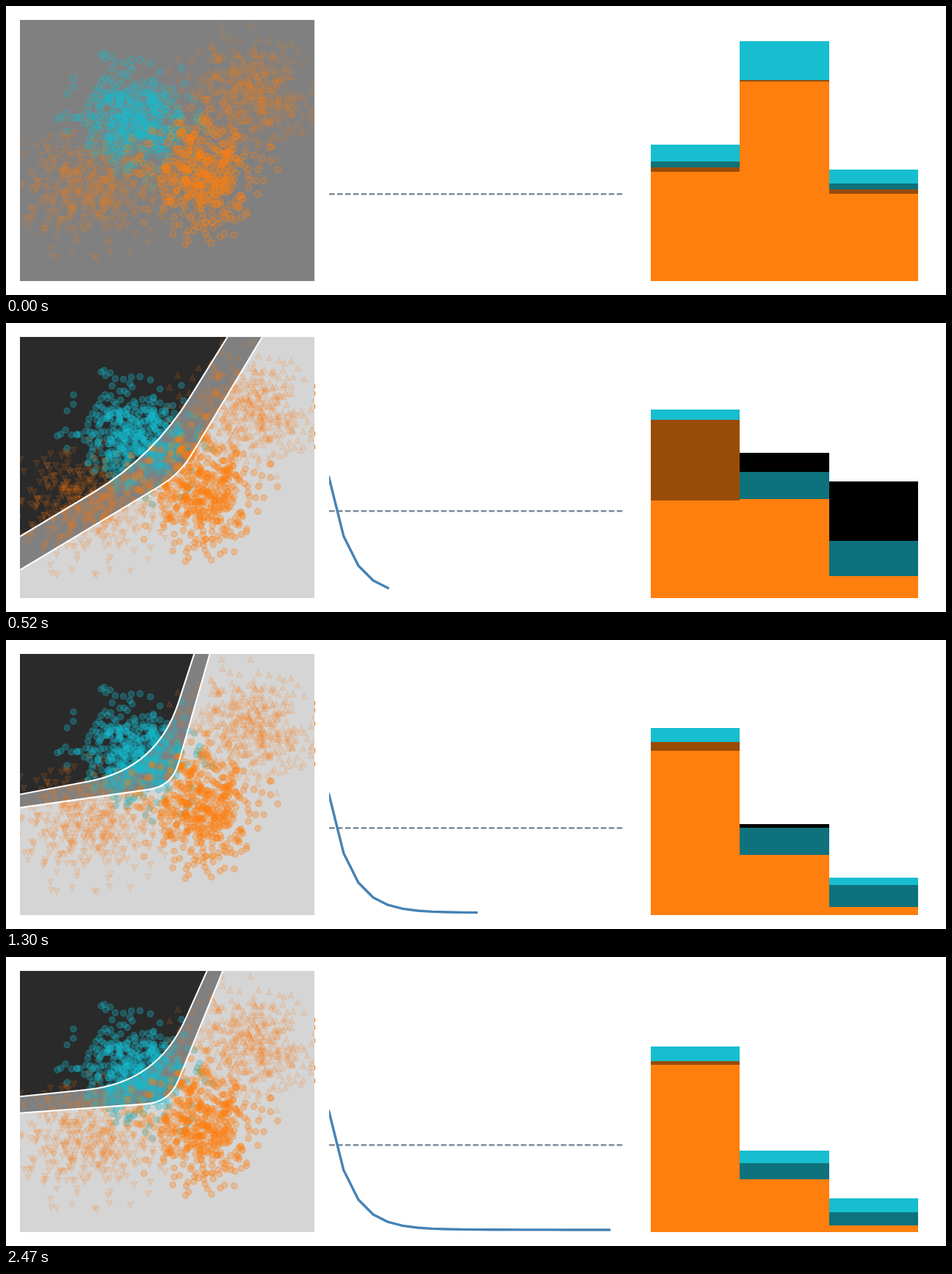
Recreate the animation shown at these times as an HTML page with a canvas. Size 1280 by 394 pixels, loop 2600 ms.

```html
<!DOCTYPE html>
<html lang="en">
<head>
<meta charset="utf-8">
<title>Classifier training</title>
<style>
  html, body { margin: 0; width: 100%; height: 100%; overflow: hidden; background: #fff; }
  canvas { display: block; }
</style>
</head>
<body>
<canvas id="stage" width="1280" height="394"></canvas>
<script>
const ctx = document.getElementById('stage').getContext('2d');
const STEP = 130, STEPS = 20;
const CYAN = '#17becf', ORANGE = '#ff7f0e';
const LEFT = 19, TOP = 19, RIGHT = 420, BASE = 375;

// Distances that shrink as training goes on
const decay = (size, rate, k) => size * rate ** k;
const bell = (size, width, k) => size * Math.exp(-k * k / width);

const lossAt = k => 372 - decay(160, 0.5, k) - decay(2, 0.8, k);

// Each contour bends at a corner between the left and the top edge
const upperContour = k => ({
  start: [LEFT, 188 + decay(171, 0.776, k - 2)],
  corner: [206 - decay(22, 0.5, k - 2), 169 + decay(17, 0.88, k - 2)],
  end: [208 + 3.4 * k + decay(142, 0.75, k - 2), TOP],
  radius: 95
});
const lowerContour = k => ({
  start: [LEFT, 212 + decay(244, 0.715, k - 2)],
  corner: [222 + decay(23, 0.8, k - 2), 198 + decay(14, 0.75, k - 2)],
  end: [230 + 3.4 * k + decay(209, 0.71, k - 2), TOP],
  radius: 32
});

// Column levels: cyan top, orange top, and the span of the dark overlay
const columns = [
  k => {
    const dip = decay(1, 0.8, k), drop = decay(1, 0.4, k);
    const orange = 142 - 30 * dip + 108 * drop;
    const shade = k ? [orange, 147 + bell(172, 27, k)] : [orange - 8, orange + 6];
    return [122 - 15 * dip + 82 * drop, orange, ...shade];
  },
  k => {
    const orange = 304 - decay(203, 0.75, k);
    const shade = k ? [282 - bell(133, 69, k), orange] : [orange, orange + 2];
    return [265 - decay(217, 0.73, k), orange, ...shade];
  },
  k => {
    const orange = 366 - decay(116, 0.65, k);
    const shade = k ? [348 - bell(204, 37, k), orange] : [orange - 8, orange + 6];
    return [329 - decay(106, 0.74, k), orange, ...shade];
  }
];

function randomizer(seed) {
  return () => {
    seed = (seed * 1664525 + 1013904223) >>> 0;
    return (seed + 0.5) / 4294967296;
  };
}

function cluster(seed, n, cx, cy, sx, sy) {
  const rand = randomizer(seed), points = [];
  while (points.length < n) {
    const r = Math.sqrt(-2 * Math.log(rand())), a = rand() * 2 * Math.PI;
    if (r < 2.9) points.push([cx + sx * r * Math.cos(a), cy + sy * r * Math.sin(a)]);
  }
  return points;
}

const groups = [
  { shape: 'circle', color: CYAN, alpha: 0.3, points: cluster(11, 430, 177, 155, 38, 36) },
  { shape: 'up', color: ORANGE, alpha: 0.12, points: cluster(23, 440, 328, 122, 42, 35) },
  { shape: 'down', color: ORANGE, alpha: 0.12, points: cluster(37, 440, 116, 252, 45, 35) },
  { shape: 'circle', color: ORANGE, alpha: 0.3, points: cluster(53, 470, 266, 228, 38, 36) }
];

// Point at a distance from a towards b; negative goes away from b
function toward(a, b, distance) {
  const dx = b[0] - a[0], dy = b[1] - a[1], f = distance / Math.hypot(dx, dy);
  return [a[0] + dx * f, a[1] + dy * f];
}

function contourPath({ start, corner, end, radius }) {
  const path = new Path2D();
  path.moveTo(...toward(start, corner, -130));
  path.lineTo(...toward(corner, start, radius));
  path.quadraticCurveTo(...corner, ...toward(corner, end, radius));
  path.lineTo(...toward(end, corner, -130));
  return path;
}

function fillSide(path, corners, color) {
  const area = new Path2D(path);
  corners.forEach(c => area.lineTo(...c));
  area.closePath();
  ctx.fillStyle = color;
  ctx.fill(area);
}

function drawMarkers({ shape, color, alpha, points }, first) {
  ctx.fillStyle = ctx.strokeStyle = color;
  ctx.lineWidth = 1.39;
  const r = 4.17, s = shape === 'up' ? -r : r;
  for (const [x, y] of points) {
    ctx.beginPath();
    if (shape === 'circle') ctx.arc(x, y, r, 0, 2 * Math.PI);
    else {
      ctx.moveTo(x, y + s);
      ctx.lineTo(x - r, y - s);
      ctx.lineTo(x + r, y - s);
      ctx.closePath();
    }
    ctx.globalAlpha = first ? alpha * 0.45 : alpha;
    ctx.fill();
    ctx.globalAlpha = first ? alpha * 1.6 : alpha;
    ctx.stroke();
  }
  ctx.globalAlpha = 1;
}

function drawScatter(k) {
  ctx.save();
  ctx.beginPath();
  ctx.rect(LEFT, TOP, RIGHT - LEFT, BASE - TOP);
  ctx.clip();
  ctx.fillStyle = '#808080';
  ctx.fillRect(LEFT, TOP, RIGHT - LEFT, BASE - TOP);
  const lines = k ? [contourPath(upperContour(k)), contourPath(lowerContour(k))] : [];
  if (k) {
    fillSide(lines[0], [[-400, -400]], '#2a2a2a');
    fillSide(lines[1], [[900, -400], [900, 900], [-400, 900]], '#d5d5d5');
  }
  groups.forEach(g => drawMarkers(g, k === 0));
  ctx.strokeStyle = '#fff';
  ctx.lineWidth = 2.08;
  lines.forEach(line => ctx.stroke(line));
  ctx.restore();
  // Markers cut by the panel's right edge
  if (k) {
    ctx.fillStyle = ORANGE;
    for (const y of [86, 96, 114, 151, 169]) ctx.fillRect(RIGHT, y - 3, 1, 6);
  }
}

function drawLoss(k) {
  ctx.save();
  ctx.beginPath();
  ctx.rect(440, TOP, 400, BASE - TOP);
  ctx.clip();
  ctx.strokeStyle = '#708090';
  ctx.lineWidth = 2.08;
  ctx.setLineDash([7.6, 3.28]);
  ctx.beginPath();
  ctx.moveTo(440, 256.4);
  ctx.lineTo(840, 256.4);
  ctx.stroke();
  if (k) {
    ctx.setLineDash([]);
    ctx.strokeStyle = '#4682b4';
    ctx.lineWidth = 3.4;
    ctx.lineJoin = 'round';
    ctx.lineCap = 'square';
    ctx.beginPath();
    for (let i = 0; i <= k; i++) ctx.lineTo(439.6 + 20.1 * i, lossAt(i));
    ctx.stroke();
  }
  ctx.restore();
}

function drawBars(k) {
  columns.forEach((levels, c) => {
    const x = Math.round(878 + c * 121.4), w = Math.round(878 + (c + 1) * 121.4) - x;
    const [cyan, orange, top, bottom] = levels(k).map(Math.round);
    const band = (y0, y1, color) => {
      if (y1 <= y0) return;
      ctx.fillStyle = color;
      ctx.fillRect(x, y0, w, y1 - y0);
    };
    band(cyan, orange, CYAN);
    band(orange, BASE, ORANGE);
    band(top, Math.min(bottom, cyan), '#000');
    band(Math.max(top, cyan), Math.min(bottom, orange), '#0e727c');
    band(Math.max(top, orange), bottom, '#994c08');
  });
}

let shown = -1;
function frame() {
  const k = Math.floor(performance.now() / STEP) % STEPS;
  if (k !== shown) {
    shown = k;
    ctx.fillStyle = '#fff';
    ctx.fillRect(0, 0, 1280, 394);
    drawScatter(k);
    drawLoss(k);
    drawBars(k);
  }
  requestAnimationFrame(frame);
}
frame();
</script>
</body>
</html>
```
